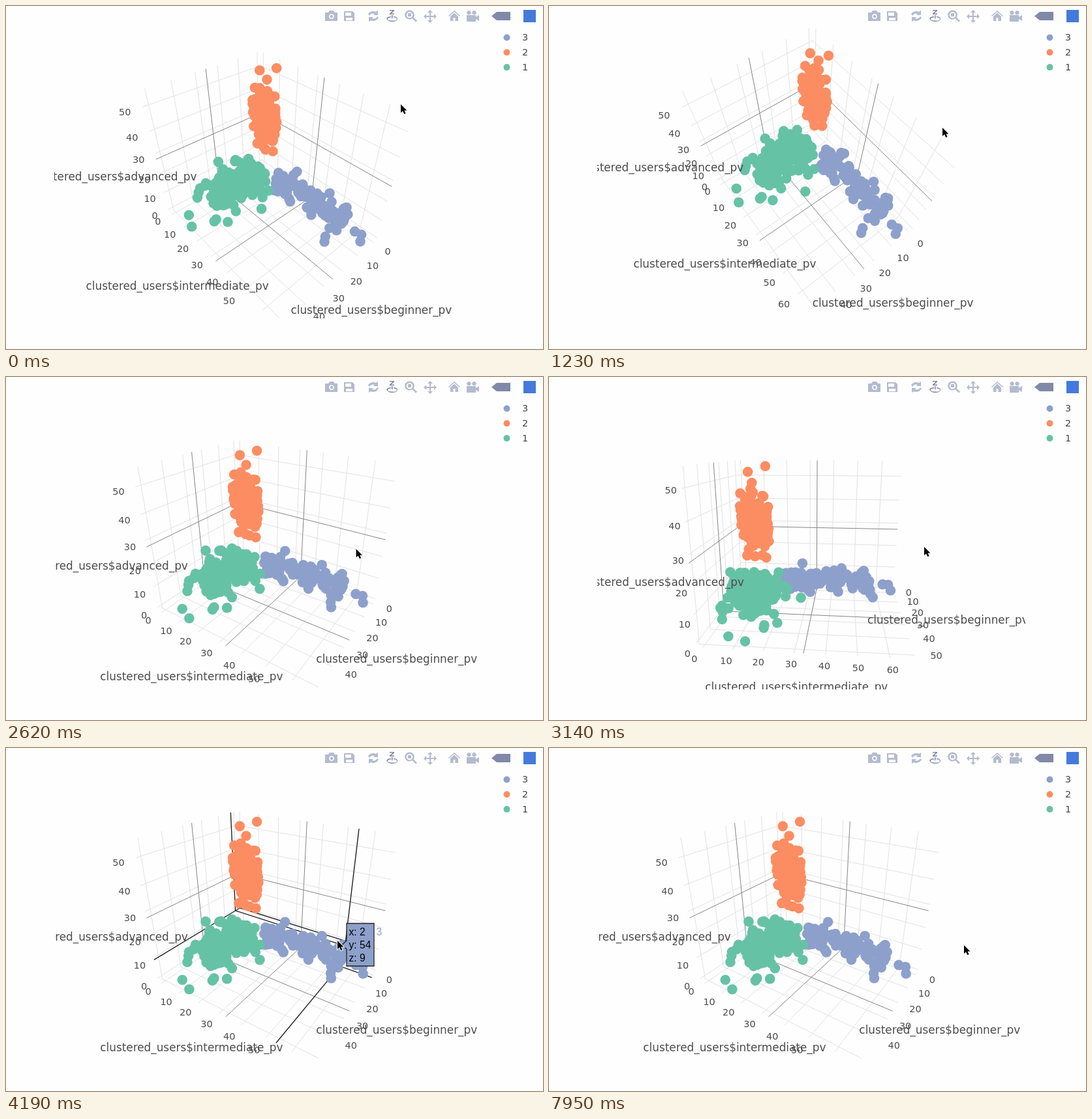
These frames come from a looping animation (823 by 527 pixels, 8 s). An HTML page with a canvas:

```html
<!DOCTYPE html>
<html lang="en">
<head>
<meta charset="utf-8">
<title>Clustered users</title>
<style>
html, body { margin: 0; width: 100%; height: 100%; overflow: hidden; background: #fefefe; }
canvas { display: block; }
</style>
</head>
<body>
<canvas id="stage" width="823" height="527"></canvas>
<script>
const ctx = document.getElementById('stage').getContext('2d');
const LOOP = 8000, STEP = 87.3;
const FONT = '"DejaVu Sans", Verdana, sans-serif';
const ARIAL = '"Liberation Sans", Arial, sans-serif';
const GREEN = '#66c2a5', ORANGE = '#fc8d62', BLUE = '#8da0cb';

// Scene in data units: x beginner, y intermediate, z advanced
const MID = [25.3, 33, 27.3], HALF = [26.9, 35, 29];
const LO = MID.map((m, i) => m - HALF[i]), HI = MID.map((m, i) => m + HALF[i]);
const FOCAL = 542, DIST = 130.4, CX = 402, CY = 255.5;
const TICK_GAP = 6.5, TITLE_GAP = 16.7, MAX_TICK = [50, 60, 50];
const PICK = [2, 54, 9];

// step, azimuth, elevation, pointer x, pointer y
const KEYS = [
  [0, 48, 39, 605, 151], [1, 48.2, 39.6, 605, 152], [10, 53.5, 62, 603, 191], [11, 53.5, 62, 603, 191],
  [14, 53, 60, 603, 187], [20, 42.5, 33.5, 625, 123], [22, 38.8, 30.2, 633, 115],
  [24, 33.8, 27.6, 642, 109], [31, 33.8, 27.6, 519, 290], [36, 5.3, 15, 575, 261],
  [42, 25, 23.7, 536, 281], [46, 33.8, 27.6, 519, 290], [48, 33.8, 27.6, 508, 296],
  [84, 33.8, 27.6, 508, 296], [85, 33.8, 27.6, 584, 284], [91, 33.8, 27.6, 636, 303]
];

let seed = 11;
const rnd = () => (seed = (seed * 16807) % 2147483647) / 2147483647;
const tri = (a, b) => a + (b - a) * (rnd() + rnd()) / 2;
const uni = (a, b) => a + (b - a) * rnd();

const points = [];
const add = (color, list) => list.forEach(p => points.push({ p, color }));
const fill = (color, n, make) => add(color, Array.from({ length: n }, make));

add(ORANGE, [[1.5, 11.4, 54], [4.4, 4.6, 51.8], [1, 5.2, 47], [2.4, 10.7, 14], [5, 2.8, 15.6], [4, 6, 15]]);
fill(ORANGE, 105, () => [uni(0, 6.5), uni(0.5, 12.5), tri(16, 46)]);
add(GREEN, [[50.3, 13.7, 0.4], [47.6, 7.2, 0.3], [40, 2.6, 2.5], [39, 2.6, 5], [25.5, 29, 5.5],
  [27, 2.2, 15.6], [19, 3.5, 12.5], [42, 18, 1], [41, 18, 1.5], [38, 22, 1]]);
fill(GREEN, 150, () => [uni(9, 38), tri(-1, 23), tri(0, 13)]);
add(BLUE, [[6.5, 65.5, 2], [5, 64.5, 4], [6, 62, 4.5], [18, 57, 3.5], [16.5, 56, 4.5], PICK, [3, 27, 12]]);
fill(BLUE, 105, () => [tri(0, 13), uni(18, 57), tri(0.5, 11)]);

let cam;
function setCamera(az, el) {
  const r = Math.PI / 180;
  cam = { c: Math.cos(az * r), s: Math.sin(az * r), ce: Math.cos(el * r), se: Math.sin(el * r) };
}
function project(p) {
  const [x, y, z] = p.map((v, i) => v - MID[i]);
  const near = cam.c * x + cam.s * y;
  const depth = DIST - cam.ce * near - cam.se * z;
  const f = FOCAL / depth;
  return [CX + f * (cam.c * y - cam.s * x), CY - f * (cam.ce * z - cam.se * near), depth];
}

function seg(a, b, color, width) {
  const [x1, y1] = project(a), [x2, y2] = project(b);
  ctx.strokeStyle = color;
  ctx.lineWidth = width;
  ctx.beginPath();
  ctx.moveTo(x1, y1);
  ctx.lineTo(x2, y2);
  ctx.stroke();
}
function text(s, x, y, size, color = '#4c4c4c', align = 'center', font = FONT) {
  ctx.font = size + 'px ' + font;
  ctx.fillStyle = color;
  ctx.textAlign = align;
  ctx.textBaseline = 'middle';
  ctx.fillText(s, x, y);
}
function dot(x, y, r, color) {
  ctx.fillStyle = color;
  ctx.beginPath();
  ctx.arc(x, y, r, 0, 7);
  ctx.fill();
}

// Lines of one axis value, on the two far faces that it crosses
function gridLine(axis, v, color, width) {
  for (let face = 0; face < 3; face++) {
    if (face === axis) continue;
    const a = LO.slice(), b = LO.slice();
    a[axis] = b[axis] = v;
    b[3 - axis - face] = HI[3 - axis - face];
    seg(a, b, color, width);
  }
}
function drawGrid() {
  for (let i = 0; i < 3; i++)
    for (let v = 0; v <= MAX_TICK[i]; v += 10) gridLine(i, v, '#e2e2e2', 1);
  for (let i = 0; i < 3; i++) gridLine(i, MID[i], '#858585', 1);
}

function drawSpikes() {
  const [x, y, z] = PICK, [x0, y0, z0] = LO, [x1, y1, z1] = HI;
  [
    [[x1, y0, z], [x0, y0, z]], [[x, y0, z1], [x, y0, z]],
    [[x0, y0, z], [x0, y, z]], [[x0, y, z1], [x0, y, z]],
    [[x1, y, z0], [x, y, z0]], [[x, y1, z0], [x, y, z0]],
    [PICK, [x, y0, z]], [PICK, [x0, y, z]], [PICK, [x, y, z0]]
  ].forEach(([a, b]) => seg(a, b, '#222', 1.4));
}

function drawLabels() {
  const edge = [
    (v, g) => [v, HI[1] + g, LO[2]],
    (v, g) => [HI[0] + g, v, LO[2]],
    (v, g) => [HI[0] + g, LO[1], v]
  ];
  ['beginner', 'intermediate', 'advanced'].forEach((name, i) => {
    for (let v = 0; v <= MAX_TICK[i]; v += 10) {
      const [x, y] = project(edge[i](v, TICK_GAP));
      text(v, x, y, 14.4);
    }
    const [x, y] = project(edge[i](MID[i], TITLE_GAP));
    text('clustered_users$' + name + '_pv', x, y, 16.85);
  });
}

function drawScene(hover) {
  ctx.save();
  ctx.beginPath();
  ctx.rect(74, 31, 656, 449);
  ctx.clip();
  drawGrid();
  if (hover) drawSpikes();
  points.map(o => [...project(o.p), o.color])
    .sort((a, b) => b[2] - a[2])
    .forEach(([x, y, , color]) => dot(x, y, 7.8, color));
  drawLabels();
  ctx.restore();
}

function drawHover() {
  ctx.fillStyle = BLUE;
  ctx.strokeStyle = '#222';
  ctx.lineWidth = 1.3;
  const box = new Path2D('M515 302.5L522 296V269.5H564V335H522V309Z');
  ctx.fill(box);
  ctx.stroke(box);
  ['x: 2', 'y: 54', 'z: 9'].forEach((s, i) => text(s, 525.5, 283.5 + i * 20.3, 15.6, '#000', 'left', ARIAL));
  text('3', 567.5, 283.5, 15.6, BLUE, 'left', ARIAL);
}

const LIGHT = '#b3bbcf', DARK = '#8089a8';
const ICONS = [
  // camera, disk
  [LIGHT, 'M490 10h4l2-3h6l2 3h4v13h-19v-13zM499 12a4 4 0 1 0 .01 0zM499 13.8a2.3 2.3 0 1 1-.01 0z'],
  [LIGHT, 'M518 8h13l3 3v12h-16zM520 10v5h9v-5zM521 18v4h10v-4z'],
  // orbit
  [LIGHT, 'M555 12q5-6 12-3l3-2v7h-7l2-2q-5-2-8 3zM571 18q-5 7-12 4l-3 2v-7h7l-2 2q5 2 8-3z'],
  // turntable
  [DARK, 'M588 6h7v1.5l-4.5 4h4.5v1.5h-7v-1.5l4.500-4h-4.500zM591 14h1.500v5h-1.500zM583 19q2-3 7-3v1.500q-5 .5-5 2.500t7 2.500 7-2.500-5-2.500v-1.500q6 0 6 4-1 4-8 4t-9-5z'],
  // magnifier
  [LIGHT, 'M618.500 6.500a7 7 0 0 1 6 11l5.500 5-2 2-5.500-5.500a7 7 0 1 1-4-12.500zM618.500 9a4.700 4.700 0 1 0 .01 0zM616 11h5v5h-5z'],
  // pan
  [LIGHT, 'M650 6l4 4h-3v5h5v-3l4 4-4 4v-3h-5v5h3l-4 4-4-4h3v-5h-5v3l-4-4 4-4v3h5v-5h-3z'],
  // home
  [LIGHT, 'M687 7l9 8-1 1-8-7-8 7-1-1zM681 16l6-5.500 6 5.500v7h-4.500v-5h-3v5h-4.500z'],
  // film camera
  [LIGHT, 'M709.500 7a3.200 3.200 0 1 1-.01 0zM717.500 7a3.200 3.200 0 1 1-.01 0zM706 14h14v3l5-3v9l-5-3v4h-14z'],
  // tag
  [DARK, 'M744 15.500l8-6.500h21v13h-21z']
].map(([color, d]) => [color, new Path2D(d)]);

function drawChrome() {
  ICONS.forEach(([color, path]) => {
    ctx.fillStyle = color;
    ctx.fill(path, 'evenodd');
  });
  ctx.fillStyle = '#447adb';
  ctx.fillRect(793, 6, 19, 19);
  [BLUE, ORANGE, GREEN].forEach((color, i) => {
    dot(767.5, 48.5 + i * 22.8, 5, color);
    text(3 - i, 791, 49.5 + i * 22.8, 14.4, '#444', 'left');
  });
}

function drawPointer(x, y) {
  const arrow = new Path2D('M0 0V13L3 10.300 5.300 15 7.600 14 5.500 9.500H9.500Z');
  ctx.save();
  ctx.translate(x, y);
  ctx.strokeStyle = '#fff';
  ctx.lineWidth = 2;
  ctx.stroke(arrow);
  ctx.fillStyle = '#000';
  ctx.fill(arrow);
  ctx.restore();
}

function pose(step) {
  const i = KEYS.findIndex(k => k[0] >= step);
  const b = KEYS[i < 0 ? KEYS.length - 1 : i], a = KEYS[Math.max(i - 1, 0)];
  const u = i > 0 ? (step - a[0]) / (b[0] - a[0]) : 1;
  return b.map((v, j) => a[j] + (v - a[j]) * u);
}

const start = performance.now();
function draw() {
  const t = Math.max(0, performance.now() - start) % LOOP;
  const step = Math.floor((t + 8) / STEP);
  const [, az, el, x, y] = pose(step);
  const hover = step >= 48 && step < 86;
  ctx.fillStyle = '#fefefe';
  ctx.fillRect(0, 0, 823, 527);
  setCamera(az, el);
  drawScene(hover);
  drawChrome();
  if (hover) drawHover();
  drawPointer(x, y);
  requestAnimationFrame(draw);
}
draw();
</script>
</body>
</html>
```
